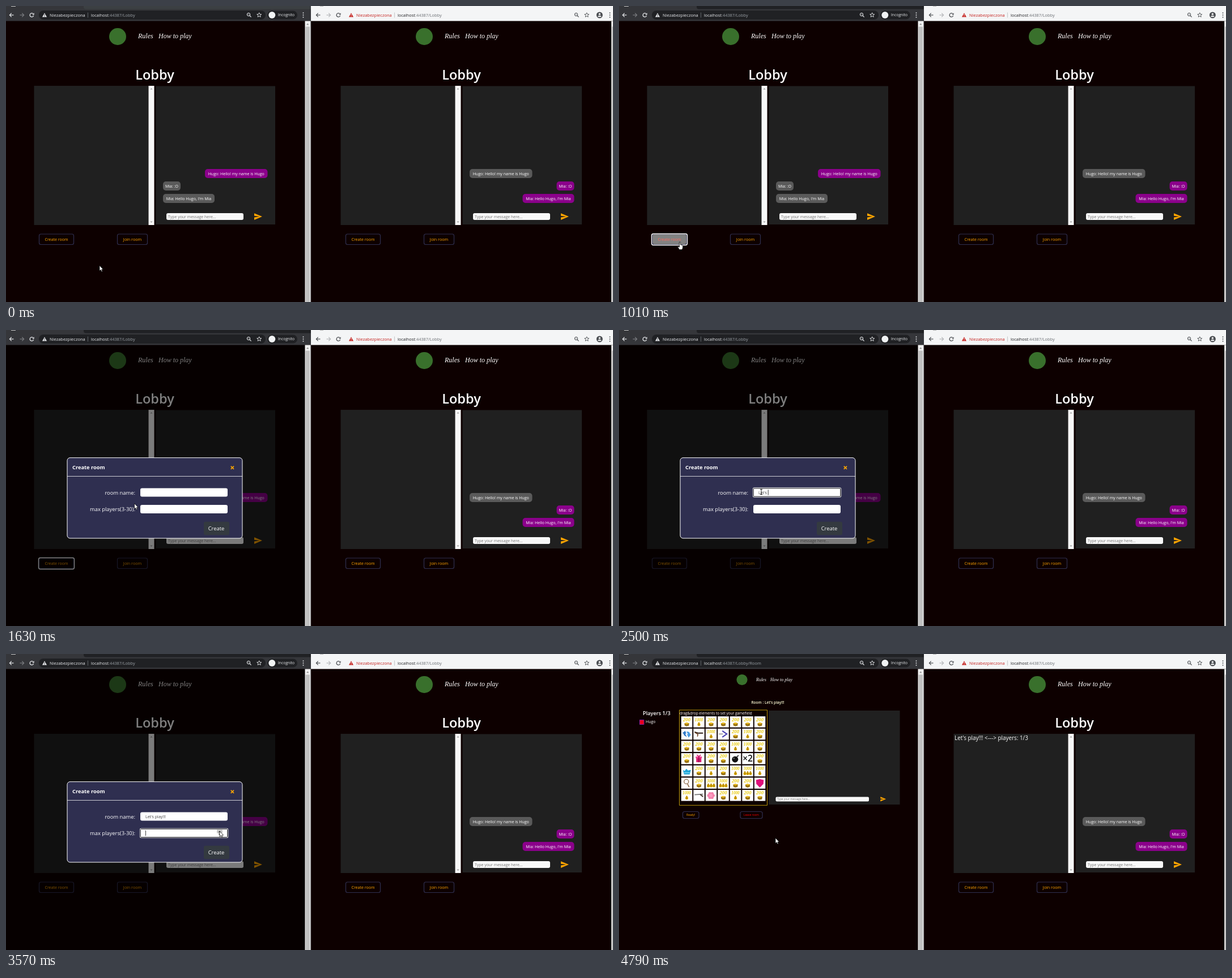
These frames come from a looping animation (1071x523 px, 4890 ms). An HTML page with a canvas:

```html
<!DOCTYPE html>
<html lang="en">
<head>
<meta charset="utf-8">
<title>Game lobby</title>
<style>
html, body { margin: 0; width: 100%; height: 100%; overflow: hidden; background: #0d0000; }
canvas { display: block; width: 1071px; height: 523px; }
</style>
</head>
<body>
<canvas id="stage" width="1071" height="523"></canvas>
<script>
const ctx = document.getElementById('stage').getContext('2d');
const LOOP = 4890, CLICK = 980, OPEN = 1025, ZOOM = 110;
const FOCUS_NAME = 1750, FOCUS_MAX = 3040, NAVIGATE = 4540;
const SANS = '"Open Sans", "Noto Sans", sans-serif';
const SERIF = '"Liberation Serif", serif';
const PAGE = '#0d0000', PANEL = '#202020', ORANGE = '#ffa500', EDGE = '#2f2f50';
const GREY = '#5a5a5a', PURPLE = '#8b008b', GOLD = '#d9a800';
const HE = 'Hugo', SHE = 'Mia', ROOM = "Let's play!!!";

// time, x, y
const PATH = [
  [0, 165, 458.5], [30, 165, 458.5], [540, 109, 431], [680, 106, 419], [880, 107, 418],
  [1160, 108, 416], [1250, 92, 420], [1700, 251, 286], [2860, 251, 286], [3000, 262, 315],
  [3180, 405, 322], [3400, 377, 313], [3780, 377, 313], [4200, 381, 354], [4450, 382, 354],
  [4700, 279, 326], [4790, 276, 325], [LOOP, 276, 325]
];

// 2 / 1 / 3: 200, 1000, 3000 coins; letters: special tiles
const BOARD = ['2122222', 'wg1>212', '2222112', '2p22bx2', 'c212131', 'm23322s', '1fk2122'];

function box(x, y, w, h, fill, r = 0, stroke, lw = 1) {
  ctx.beginPath();
  ctx.roundRect(x, y, w, h, r);
  if (fill) { ctx.fillStyle = fill; ctx.fill(); }
  if (stroke) { ctx.strokeStyle = stroke; ctx.lineWidth = lw; ctx.stroke(); }
}

function text(s, x, y, size, fill, style = '', align = 'left', family = SANS) {
  ctx.font = `${style} ${size}px ${family}`;
  ctx.textAlign = align;
  ctx.fillStyle = fill;
  ctx.fillText(s, x, y);
}

function dot(x, y, r, fill) {
  ctx.beginPath();
  ctx.arc(x, y, r, 0, 7);
  ctx.fillStyle = fill;
  ctx.fill();
}

function trace(points, close) {
  ctx.beginPath();
  for (let i = 0; i < points.length; i += 2) ctx.lineTo(points[i], points[i + 1]);
  if (close) ctx.closePath();
}

function poly(points, fill) {
  trace(points, true);
  ctx.fillStyle = fill;
  ctx.fill();
}

function line(points, stroke, lw = 1) {
  trace(points);
  ctx.strokeStyle = stroke;
  ctx.lineWidth = lw;
  ctx.stroke();
}

function arc(x, y, r, a, b, stroke, lw = 1) {
  ctx.beginPath();
  ctx.arc(x, y, r, a, b);
  ctx.strokeStyle = stroke;
  ctx.lineWidth = lw;
  ctx.stroke();
}

function at(x, y, scale, draw) {
  ctx.save();
  ctx.translate(x, y);
  ctx.scale(scale, scale);
  draw();
  ctx.restore();
}

function star(x, y, r, stroke) {
  const p = [];
  for (let i = 0; i < 11; i++) {
    const a = -Math.PI / 2 + i * Math.PI / 5, d = i % 2 ? r * .45 : r;
    p.push(x + d * Math.cos(a), y + d * Math.sin(a));
  }
  line(p, stroke, .9);
}

function navArrow(x, dir, color) {
  line([x - 3.5, 16, x + 3.5, 16], color, 1.2);
  line([x + dir * .3, 12.6, x + dir * 3.6, 16, x + dir * .3, 19.4], color, 1.2);
}

function toolbar(dx, end, c, path) {
  navArrow(10 + dx, -1, c.icon);
  navArrow(28 + dx, 1, c.off);
  arc(45.5 + dx, 16, 3.3, .3, 5.4, c.icon, 1.2);
  poly([46.3 + dx, 15.5, 49.6 + dx, 15.5, 49.6 + dx, 12.2], c.icon);
  poly([64 + dx, 19.5, 68 + dx, 12.3, 72 + dx, 19.5], c.warn);
  box(67.5 + dx, 14.6, 1, 2.4, c.bar);
  box(67.5 + dx, 17.7, 1, 1, c.bar);
  text('Niezabezpieczona', 77 + dx, 18.7, 7.5, c.warn);
  box(144 + dx, 11.5, 1, 9, c.split);
  text('localhost', 150 + dx, 18.7, 7.4, c.host);
  const w = ctx.measureText('localhost').width;
  text(':44387/' + path, 150 + dx + w, 18.7, 7.4, c.path);
  arc(428 + end, 15, 2.7, 0, 7, c.icon);
  line([430 + end, 17, 432.6 + end, 19.6], c.icon, 1.2);
  line([426.8 + end, 15, 429.2 + end, 15], c.icon, .7);
  star(446.7 + end, 16, 4.2, c.icon);
}

function menuDots(x, color) {
  for (const y of [12.3, 16, 19.7]) dot(x, y, .95, color);
}

function chrome(path, active) {
  box(0, 0, 538, 26.5, '#35363a');
  box(137, 0, 401, 5.5, active ? '#202124' : '#3c4043', [0, 0, 0, 4]);
  box(9, 0, 8, 1, '#c8c8c8');
  box(58, 8, 400, 16, '#202124', 8);
  box(461, 8.5, 53, 15, '#202124', 7.5);
  toolbar(0, 0, { icon: '#e8eaed', off: '#7c7e82', warn: '#e8eaed', bar: '#202124', split: '#5f6368',
    host: '#e8eaed', path: '#9aa0a6' }, path);
  dot(469.3, 16, 6, '#f1f3f4');
  text('Incognito', 480, 18.4, 6.7, '#e8eaed');
  menuDots(524.5, '#e8eaed');

  box(538, 0, 533, 26.5, '#f4f5f6');
  box(554, 0, 6, 1, '#b8b8b8');
  toolbar(541, 578, { icon: '#4a4d51', off: '#b4b6b9', warn: '#c5221f', bar: '#f4f5f6', split: '#c4c6c9',
    host: '#202124', path: '#6b6f74' }, 'Lobby');
  dot(1047.3, 16, 5.5, '#4a4d51');
  dot(1047.3, 14.2, 1.7, '#f4f5f6');
  box(1044.2, 16.9, 6.2, 2.4, '#f4f5f6', [2, 2, 0, 0]);
  menuDots(1065.5, '#4a4d51');

  box(527.5, 26.5, 9.5, 497, '#f1f1f1');
  box(528.5, 36.5, 7.5, 487, '#c1c1c1');
  poly([530, 33.3, 534.4, 33.3, 532.2, 30.8], '#8b8b8b');
  box(537, 26.5, 1.2, 497, '#8e8e90');
  box(1068, 26.5, 3, 497, '#e9e9e9');
  box(1069, 36.5, 2, 487, '#c1c1c1');
}

function plane(x, y, scale) {
  at(x, y, scale, () =>
    poly([0, 0, 14, 5.8, 0, 11.6, 0, 7.1, 9.5, 5.8, 0, 4.5], ORANGE));
}

function nav(logoX, logoY, r, x1, x2, y, size) {
  dot(logoX, logoY, r, '#39702c');
  text('Rules', x1, y, size, '#fff', 'italic', 'left', SERIF);
  text('How to play', x2, y, size, '#fff', 'italic', 'left', SERIF);
}

function button(label, x, y, w, h, size, color, hover) {
  box(x + .5, y + .5, w - 1, h - 1, hover ? '#828282' : null, 3, EDGE, 1.2);
  text(label, x + w / 2, y + h / 2 + size * .37, size, hover ? '#ff6a5e' : color, '', 'center');
}

function bubble(s, y, mine, w) {
  const x = mine ? 461.5 - w : 277;
  box(x, y, w, 16, mine ? PURPLE : GREY, 5);
  text(s, x + w / 2, y + 10.6, 7.05, '#fff', '', 'center');
}

function lobby({ dx, he, hover, focus, room }) {
  ctx.save();
  ctx.translate(dx, 0);
  nav(197, 54, 15, 233, 269, 57, 12);
  text('Lobby', 262.5, 130, 23.5, '#fff', '600', 'center');
  box(49.5, 141, 202, 246, PANEL);
  box(251.5, 141, 10, 246, '#f8f8f8');
  poly([254.3, 147.5, 258.7, 147.5, 256.5, 145], '#a3a3a3');
  poly([254.3, 380.5, 258.7, 380.5, 256.5, 383], '#a3a3a3');
  box(264.5, 141.5, 210.5, 244.5, PANEL);
  bubble(`${HE}: Hello! my name is ${HE}`, 288, he, 110.5);
  bubble(`${SHE}: :O`, 310, !he, 31);
  bubble(`${SHE}: Hello ${HE}, I'm ${SHE}`, 332, !he, 91);
  box(283, 366, 136, 12, '#f8f8f8', 3);
  text('Type your message here...', 286, 375, 6.95, '#757575');
  plane(438, 366.3, 1);
  button('Create room', 58, 402.5, 62, 19.5, 7.06, ORANGE, hover);
  button('Join room', 196, 402.5, 54, 19.5, 7.2, ORANGE);
  if (focus) box(57.5, 402.5, 63, 20, null, 3, '#fff', 1.4);
  if (room) text(`${ROOM} <---> players: 1/3`, 592 - 541, 151.5, 9.9, '#fff');
  ctx.restore();
}

function field(y, focused, value, caret) {
  if (focused) {
    box(235.8, y - 1.2, 156.6, 17.4, '#fff', 3);
    box(236.6, y - .4, 155, 15.8, '#101018', 2);
  }
  box(237, y, 154, 15, '#fff', focused ? 1 : 3);
  if (focused) box(237.4, y + .4, 153.2, 14.2, null, 1, '#202028', .8);
  text(value, 246, y + 10.2, 7.05, '#404040');
  if (focused && caret) box(246 + ctx.measureText(value).width, y + 2.8, .8, 9.5, '#111');
}

function modal(t, scale) {
  ctx.save();
  ctx.translate(262.5, 297);
  ctx.scale(scale, scale);
  ctx.translate(-262.5, -297);
  box(108, 225.7, 309, 142.3, '#2f2f50', 5, '#fff', 1);
  box(108, 258.2, 309, .9, '#fff');
  text('Create room', 117, 245.5, 9.3, '#fff', 'bold');
  line([396.8, 240.7, 402, 245.9], ORANGE, 1.7);
  line([402, 240.7, 396.8, 245.9], ORANGE, 1.7);
  text('room name:', 228, 290.5, 9.4, '#fff', '', 'right');
  text('max players(3-30):', 228, 320, 9.4, '#fff', '', 'right');

  const typed = Math.max(0, Math.floor((t - 2200) / 46));
  const onMax = t >= FOCUS_MAX;
  const caret = t < 3960;
  field(279.5, t >= FOCUS_NAME && !onMax, ROOM.slice(0, typed), caret);
  field(309, onMax, t >= 3620 ? '3' : '', caret);
  if (onMax) {
    if (t > 3500 && t < 3640) box(372, 310.5, 10, 6, '#c6c6c6');
    poly([374.6, 315.2, 379.2, 315.2, 376.9, 312.6], '#404040');
    poly([374.6, 317.6, 379.2, 317.6, 376.9, 320.2], '#404040');
  }
  box(349, 338.7, 45, 23.5, '#343a40', 3);
  text('Create', 371, 354, 9.4, '#fff', '', 'center');
  ctx.restore();
}

function pouch(x, y) {
  dot(x, y, 2.6, GOLD);
  box(x - 1.2, y - 4, 2.4, 2.2, '#b98900');
  dot(x, y, .9, '#8a6400');
}

function chest() {
  poly([5.5, 12.5, 9, 10.7, 14, 12, 13.4, 16.6, 9, 17.5, 6, 16], '#9b7412');
  poly([5.5, 12.5, 9, 10.7, 14, 12, 10, 13.7], '#f0c020');
}

const coins = { 2: '200', 1: '1000', 3: '3000' };
const special = {
  w() {
    poly([2, 8, 7, 4, 9, 9, 7, 9, 10, 15, 5, 12, 4, 9], '#2f78c8');
    poly([17, 11, 13, 16, 10, 10, 12, 10, 9, 5, 14, 6, 16, 10], '#4a9be0');
  },
  g() {
    line([2, 6, 9, 8, 17, 8], '#2c1d14', 2);
    line([3, 7, 8, 10, 7, 14], '#6b3b1c', 1.5);
  },
  '>'() { line([2, 9.5, 9, 9.5], '#777', 1.2); line([8, 4, 16, 9.5, 8, 15], '#4840b0', 2); },
  p() {
    box(5, 8, 9, 8, '#d81b70');
    box(4, 6, 11, 3, '#ef3f8f');
    line([9.5, 6, 9.5, 16], '#7f0e44', 1.3);
    line([6, 3, 9.5, 6, 13, 3], '#d81b70', 1.5);
  },
  b() { dot(9, 11, 5.5, '#111'); line([12, 7, 15, 4], '#333', 1.8); dot(7, 9, 1.2, '#777'); },
  x() { text('×2', 9.8, 15, 15.5, '#111', '600', 'center'); },
  c() {
    poly([3, 8, 6, 10, 9, 6, 12, 9, 17, 8, 15, 16, 5, 16], '#1fa4d8');
    line([5, 13, 15, 13], '#8fe0f8', 1.2);
  },
  m() { arc(9, 7, 4, 0, 7, '#8d6a4a', 1.3); line([11, 11, 14, 17], '#8d6a4a', 1.6); },
  s() { poly([3, 4, 9.7, 2.5, 16.5, 4, 16, 11, 9.7, 17.5, 3.5, 11], '#e0107a'); },
  f() { line([2, 8.5, 17, 7.5], '#777', 1.6); line([12, 8, 17, 12], '#54443a', 2); },
  k() {
    for (let i = 0; i < 6; i++) dot(9.5 + 4 * Math.cos(i * 1.05), 10 + 4 * Math.sin(i * 1.05), 2.7, '#f582ad');
    dot(9.5, 10, 3, '#fa9cc0');
  }
};

function tile(kind) {
  box(0, 0, 19.5, 19.5, '#fff');
  const sum = coins[kind];
  if (!sum) return special[kind]();
  text(sum, 9.7, 8.3, kind === '2' ? 8.6 : 7.2, '#e8c800', 'italic bold', 'center', SERIF);
  if (kind === '2') chest();
  if (kind === '3') { pouch(4.8, 14.5); pouch(14.6, 14.5); }
  if (kind !== '2') pouch(9.7, 14.5);
}

function roomPage() {
  nav(217, 45.5, 9.6, 242, 267, 47.5, 8);
  text(`Room : ${ROOM}`, 262.5, 87.5, 6.5, '#ffffd8', '600', 'center');
  text('Players 1/3', 42, 108, 9.2, '#fff', '600');
  box(36.5, 116.5, 7.5, 8, '#e8001c', 0, '#7a1fa0');
  text(HE, 47, 122, 7, '#fff');
  box(106.5, 99, 155, 168.3, null, 0, '#b8960b');
  text('drag&drop elements to set your gamefield', 107, 107, 6.47, '#fff');
  BOARD.forEach((row, j) => [...row].forEach((kind, i) =>
    at(109.8 + 21.5 * i, 110.2 + 21.65 * j, 1, () => tile(kind))));
  box(264, 100, 231.5, 166, PANEL);
  box(276.5, 252.5, 164.5, 8, '#f8f8f8', 2);
  text('Type your message here...', 279, 258.3, 4.76, '#757575');
  plane(461.3, 252.3, .7);
  button('Ready!', 112, 278, 29.5, 13, 4.9, ORANGE);
  button('Leave room', 213.5, 278, 40, 13, 4.9, '#f00');
}

function pointer(t) {
  const i = Math.max(1, PATH.findIndex(p => p[0] > t));
  const [t0, x0, y0] = PATH[i - 1], [t1, x1, y1] = PATH[i];
  const k = (t - t0) / (t1 - t0);
  return [x0 + (x1 - x0) * k, y0 + (y1 - y0) * k];
}

const inside = ([px, py], x, y, w, h) => px >= x && px <= x + w && py >= y && py <= y + h;

function arrow() {
  trace([0, 0, 0, 9.6, 2.2, 7.6, 3.7, 11, 5.2, 10.3, 3.8, 7.1, 6.6, 7.1], true);
  ctx.fillStyle = '#fff';
  ctx.strokeStyle = '#000';
  ctx.lineWidth = .7;
  ctx.fill();
  ctx.stroke();
}

function hand() {
  trace([-1, 0, .6, 0, .9, 4.5, 5.3, 6, 5, 10.5, 4, 13.3, -1, 13.3, -3.8, 8.8, -3.4, 7.6, -1, 9], true);
  ctx.lineJoin = 'round';
  ctx.fillStyle = '#fff';
  ctx.strokeStyle = '#111';
  ctx.lineWidth = .8;
  ctx.fill();
  ctx.stroke();
  ctx.lineJoin = 'miter';
}

function beam() {
  line([-2, -4.5, 2, -4.5], '#222');
  line([-2, 4.5, 2, 4.5], '#222');
  line([0, -4.5, 0, 4.5], '#222');
}

function cursor(pos, open, hover) {
  let shape = hover ? hand : arrow;
  if (open) {
    if (inside(pos, 349, 338, 45, 24)) shape = hand;
    else if (inside(pos, 237, 279, 154, 15) || inside(pos, 237, 309, 133, 15)) shape = beam;
  }
  at(pos[0], pos[1], 1, shape);
}

function draw(t) {
  const pos = pointer(t);
  const inRoom = t >= NAVIGATE;
  const open = t >= OPEN && !inRoom;
  const hover = t < OPEN && inside(pos, 58, 402, 62, 20.5);

  box(0, 0, 1071, 523, PAGE);
  lobby({ dx: 541, room: t >= 4600 });
  if (inRoom) {
    roomPage();
  } else {
    lobby({ dx: 0, he: true, hover, focus: t > CLICK && t < FOCUS_NAME });
    if (open) {
      const k = Math.min(1, (t - OPEN) / ZOOM);
      const ease = k * k * (3 - 2 * k);
      box(0, 26.5, 528, 497, `rgba(0,0,0,${ease / 2})`);
      modal(t, ease);
    }
  }
  chrome(inRoom ? 'Lobby/Room' : 'Lobby', t > CLICK);
  cursor(pos, open, hover);
}

const start = performance.now();
function tick(now) {
  draw(Math.max(0, now - start) % LOOP);
  requestAnimationFrame(tick);
}
draw(0);
requestAnimationFrame(tick);
</script>
</body>
</html>
```
